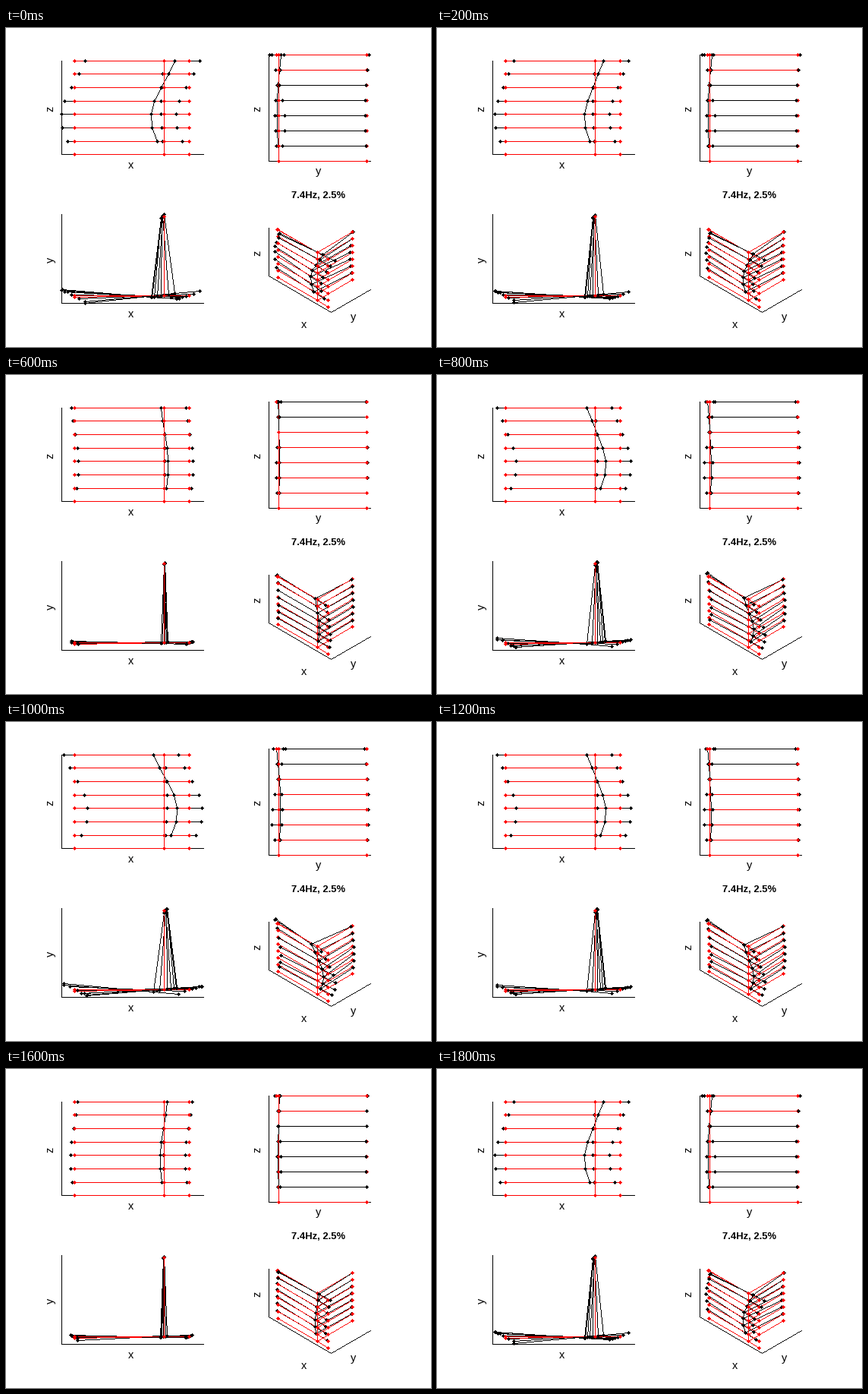
Write a matplotlib script that moves like this. It is 560 px wide and 420 px high and loops after 2000 ms.

```python
import numpy as np
import matplotlib.pyplot as plt
from matplotlib.animation import FuncAnimation

W, H, DPI = 560, 420, 80
PX = 72 / DPI
FRAMES, INTERVAL = 10, 200
LEVELS = 8
RED, BLACK = (255, 0, 0), (0, 0, 0)

plt.rcParams["font.family"] = "Liberation Sans"
fig = plt.figure(figsize=(W / DPI, H / DPI), dpi=DPI, facecolor="white")

# Plan of one storey: left, corner, right, far; one more sensor on the top storey
PLAN = [(17, 10), (135, 10), (168, 10), (135, 114)]
rest = np.array([(x, y, z) for z in range(LEVELS) for x, y in PLAN]
                + [(17, 7.6, LEVELS - 1)], float)


def bend(top, *harmonics):
    """Displacement up the height: a linear lean plus sine harmonics."""
    t = np.arange(LEVELS) / (LEVELS - 1)
    return top * t + sum(h * np.sin(k * np.pi * t)
                         for k, h in enumerate(harmonics, 1))


sway = bend(14, -22, -2.9, 0.8)
shift = bend(3, -3.5)
mode = np.zeros_like(rest)
mode[:-1, 0] = np.column_stack([sway, sway, sway, bend(0, -3.7)]).ravel()
mode[:-1, 1] = np.column_stack([bend(-8, 10.4, 1.8), shift,
                                bend(6, -7.2), shift]).ravel()
mode[-1] = mode[4 * LEVELS - 4]


def storey_edges(first):
    """Links between sensors, from the given storey upwards."""
    edges = []
    for z in range(first, LEVELS):
        corner = 4 * z + 1
        edges += [(corner, corner + d) for d in (-1, 1, 2)]
        if z > first:
            edges.append((corner - 4, corner))
    edges.append((4 * LEVELS - 3, 4 * LEVELS))
    return np.array(edges)


RED_EDGES, BLACK_EDGES = storey_edges(0), storey_edges(1)

# Each view: axis corners, projection to pixels, nearness to the viewer
VIEWS = [
    ([(73, 43), (73, 166), (260, 166)],
     lambda x, y, z: (73 + x, 166.3 - 17.64 * z),
     lambda x, y, z: 0 * y),
    ([(346, 35), (346, 175), (480, 175)],
     lambda x, y, z: (347.8 + 1.116 * y, 175 - 20 * z),
     lambda x, y, z: -x),
    ([(73, 245), (73, 362), (260, 362)],
     lambda x, y, z: (73 + x, 362 - y),
     lambda x, y, z: z),
    ([(346, 263), (346, 326), (428, 374), (480, 344)],
     lambda x, y, z: (346 + 0.4385 * x + 0.444 * y,
                      326 + 0.2567 * x - 0.256 * y - 9 * z),
     lambda x, y, z: x - y + 14 * z),
]


def to_pixel(p):
    return np.floor(np.asarray(p) + 0.5).astype(int)


def draw_line(img, a, b, color):
    """Hard-edged line, one pixel wide."""
    a, b = to_pixel(a), to_pixel(b)
    steps = np.abs(b - a).max() + 1
    x, y = to_pixel(np.linspace(a, b, steps)).T
    img[y, x] = color


def draw_dot(img, p, color):
    x, y = to_pixel(p)
    for d in range(-2, 3):
        r = 2 - abs(d)
        img[y + d, x - r:x + r + 1] = color


def draw_view(img, project, nearness, moved):
    lines, dots = [], []
    for pts, edges, start, color in [(moved, BLACK_EDGES, 4, BLACK),
                                     (rest, RED_EDGES, 0, RED)]:
        pos = np.column_stack(project(*pts.T))
        near = nearness(*pts.T)
        lines += [(near[i] + near[j], pos[i], pos[j], color) for i, j in edges]
        dots += [(near[i], pos[i], color) for i in range(start, len(pts))]
    for _, a, b, color in sorted(lines, key=lambda item: item[0]):
        draw_line(img, a, b, color)
    for _, p, color in sorted(dots, key=lambda item: item[0]):
        draw_dot(img, p, color)


backdrop = np.full((H, W, 3), 255, np.uint8)
for corners, _, _ in VIEWS:
    for start, end in zip(corners, corners[1:]):
        draw_line(backdrop, start, end, BLACK)
picture = fig.figimage(backdrop, origin="upper")


def label(x, y, s, size=14.5, **kw):
    fig.text((x + 0.5) / W, 1 - y / H, s, fontsize=size * PX, ha="center",
             va="baseline", rotation_mode="anchor", **kw)


for x, y, s in [(164, 185, "x"), (411, 193, "y"), (164, 381, "x"),
                (392, 395, "x"), (457, 385, "y")]:
    label(x, y, s)
for x, y, s in [(62, 106, "z"), (335, 106, "z"), (62, 305, "y"), (335, 296, "z")]:
    label(x, y, s, rotation=90)
label(411.5, 224, "7.4Hz, 2.5%", size=13, weight="bold")


def update(i):
    moved = rest + mode * np.cos(2 * np.pi * i / FRAMES)
    img = backdrop.copy()
    for _, project, nearness in VIEWS:
        draw_view(img, project, nearness, moved)
    picture.set_data(img)
    return [picture]


anim = FuncAnimation(fig, update, frames=FRAMES, interval=INTERVAL,
                     repeat=True, repeat_delay=0, blit=False)
plt.show()
```
